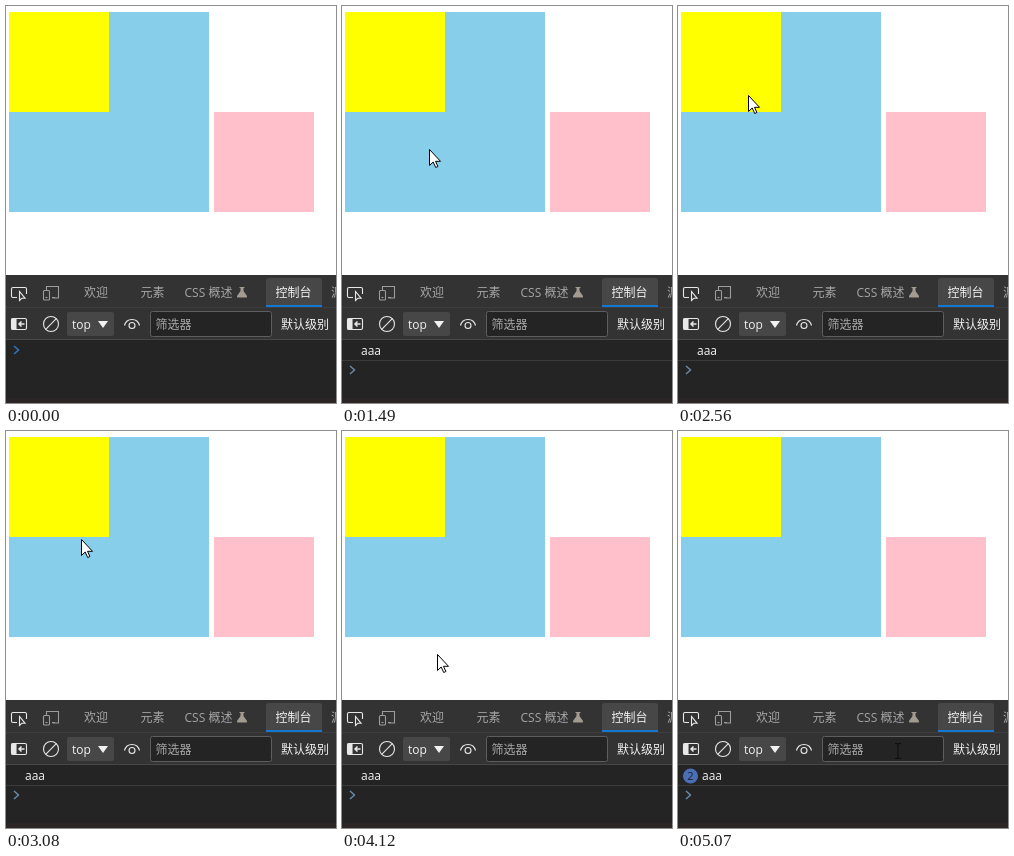
An HTML page that plays this animation: 330x397 px, repeating every 5.87 s.

```html
<!DOCTYPE html>
<html lang="zh-CN">
<head>
<meta charset="utf-8">
<title>Mouse enter log</title>
<style>
html, body { margin: 0; width: 100%; height: 100%; overflow: hidden; background: #fff; }
svg { display: block; }
text { font: 12px "Open Sans", "Noto Sans CJK SC", "Noto Sans CJK", sans-serif; fill: #f2f2f2; }
.dim { fill: #a6a6a6; }
.line { fill: none; stroke: #e8e8e8; stroke-width: 1.1; }
.gray { stroke: #9c9c9c; }

.timed { animation: 5870ms step-end infinite; }
#pointer { animation-name: move; }
#ibeam { animation-name: ibeam; }
#empty { animation-name: empty; }
#log { animation-name: log; }
#once { animation-name: once; }
#twice { animation-name: twice; }

@keyframes empty { 0% { visibility: visible } 20.78%, 100% { visibility: hidden } }
@keyframes log { 0% { visibility: hidden } 20.78%, 100% { visibility: visible } }
@keyframes once { 0%, 77%, 100% { visibility: hidden } 20.78% { visibility: visible } }
@keyframes twice { 0% { visibility: hidden } 77%, 100% { visibility: visible } }
@keyframes ibeam { 0% { visibility: hidden } 86.37%, 100% { visibility: visible } }

@keyframes move {
  0% { transform: translate(-50px, 0) }
  /* in from the console */
  4.77% { transform: translate(165px, 380px) }
  6.98% { transform: translate(126px, 298px) }
  9.19% { transform: translate(100px, 243px) }
  11.75% { transform: translate(101px, 233px) }
  14.13% { transform: translate(101px, 229px) }
  16.35% { transform: translate(101px, 226px) }
  18.56% { transform: translate(99px, 213px) }
  /* into the blue box, then the yellow one */
  20.78% { transform: translate(93px, 178px) }
  22.99% { transform: translate(87px, 148px) }
  25.38% { transform: translate(87px, 143px) }
  27.76% { transform: translate(83px, 126px) }
  29.98% { transform: translate(71px, 91px) }
  32.19% { transform: translate(58px, 58px) }
  34.41% { transform: translate(49px, 37px) }
  36.62% { transform: translate(47px, 39px) }
  /* back and forth over the edge */
  39.18% { transform: translate(51px, 48px) }
  41.39% { transform: translate(60px, 67px) }
  43.61% { transform: translate(70px, 89px) }
  45.82% { transform: translate(78px, 106px) }
  48.04% { transform: translate(82px, 114px) }
  50.25% { transform: translate(86px, 130px) }
  52.47% { transform: translate(75px, 108px) }
  54.68% { transform: translate(59px, 73px) }
  56.89% { transform: translate(52px, 54px) }
  59.11% { transform: translate(66px, 83px) }
  61.32% { transform: translate(69px, 81px) }
  63.54% { transform: translate(74px, 104px) }
  65.75% { transform: translate(82px, 145px) }
  67.97% { transform: translate(90px, 190px) }
  /* out, and in again */
  70.18% { transform: translate(95px, 223px) }
  72.4% { transform: translate(95px, 235px) }
  77% { transform: translate(98px, 168px) }
  79.55% { transform: translate(98px, 164px) }
  84.15% { transform: translate(248px, 286px) }
  86.37%, 100% { transform: translate(-50px, 0) }
}
</style>
</head>
<body>
<svg width="330" height="397">
  <rect x="3" y="6" width="200" height="200" fill="skyblue"/>
  <rect x="3" y="6" width="100" height="100" fill="yellow"/>
  <rect x="208" y="106" width="100" height="100" fill="pink"/>

  <!-- panel -->
  <rect y="269" width="330" height="128" fill="#333"/>
  <rect y="301" width="330" height="1" fill="#3d3d3d"/>
  <rect y="333" width="330" height="1" fill="#474747"/>
  <rect y="334" width="330" height="58" fill="#242424"/>
  <rect y="392" width="330" height="5" fill="#2b2526"/>

  <!-- tabs -->
  <path d="M260 301V275q0-3 3-3h50q3 0 3 3v26z" fill="#474747"/>
  <rect x="260" y="299" width="56" height="2" fill="#1278d0"/>
  <g class="line">
    <path d="M11 291.5H7q-1.500 0-1.500-1.500v-7q0-1.500 1.500-1.500h12q1.500 0 1.500 1.500v5"/>
    <path d="M13.500 285.500v9l2.300-2.200h3.300z"/>
  </g>
  <g class="line gray">
    <path d="M40.500 284v-3.500h12v11.500h-6M46 291.500h3"/>
    <rect x="37.500" y="284.500" width="6" height="9.500" rx="1"/>
    <path d="M39.500 291.500h2"/>
  </g>
  <g class="dim">
    <text class="dim" x="78" y="291">欢迎</text>
    <text class="dim" x="134.500" y="291">元素</text>
    <text class="dim" x="178.500" y="291">CSS</text>
    <text class="dim" x="202.500" y="291">概述</text>
    <text class="dim" x="325" y="291">源</text>
    <path d="M233.500 281h5v1h-1v3l3.500 5q.5 1.500-1 1.500h-8q-1.500 0-1-1.500l3.500-5v-3h-1z" fill="#a39a90"/>
  </g>
  <text x="269.500" y="291">控制台</text>

  <!-- toolbar -->
  <g class="line">
    <rect x="5.500" y="312.500" width="15" height="11" rx="1.500"/>
    <path d="M6 313h4v10H6z" fill="#e8e8e8"/>
    <path d="M18.500 318h-5M15.500 315.500l-2.500 2.500 2.500 2.500" stroke-width="1.500"/>
    <circle cx="45" cy="318" r="7.500"/>
    <path d="M39.700 323.300l10.600-10.600"/>
    <path d="M118.500 319.500q1.500-6 7.500-6t7.500 6"/>
    <circle cx="126" cy="319.500" r="3"/>
  </g>
  <rect x="61" y="306" width="47" height="24" rx="2" fill="#474747"/>
  <text x="66" y="323">top</text>
  <path d="M92 315h10l-5 7z" fill="#f2f2f2"/>
  <rect x="144.500" y="305.500" width="121" height="25" rx="2" fill="#242424" stroke="#5e5e5e"/>
  <text class="dim" x="149.500" y="323">筛选器</text>
  <text x="275" y="323" font-weight="500" style="font-weight:500">默认级别</text>

  <!-- console -->
  <path id="empty" class="timed" d="M8 340l4.500 4-4.500 4" fill="none" stroke="#3573b8" stroke-width="1.600"/>
  <g id="log" class="timed">
    <rect y="354" width="330" height="1" fill="#3b3b3b"/>
    <path d="M8 360l4.500 4-4.500 4" fill="none" stroke="#6d8ca8" stroke-width="1.400"/>
  </g>
  <text id="once" class="timed" x="19" y="349">aaa</text>
  <g id="twice" class="timed">
    <circle cx="12.500" cy="345" r="7.500" fill="#4a6fb5"/>
    <text x="12.500" y="349" text-anchor="middle" style="font-size:11px;fill:#1c2230">2</text>
    <text x="24" y="349">aaa</text>
  </g>

  <!-- pointers -->
  <path id="ibeam" class="timed" d="M217 312.500h2.500l.5 1 .5-1h2.500M220 313v14M217 327.500h2.500l.5-1 .5 1h2.500" fill="none" stroke="#0c0c0c"/>
  <path id="pointer" class="timed" d="M.5.5v16l3.700-3.500 2.500 5.500 2.200-1-2.400-5.200h5z" fill="#fff" stroke="#000"/>
</svg>
</body>
</html>
```
